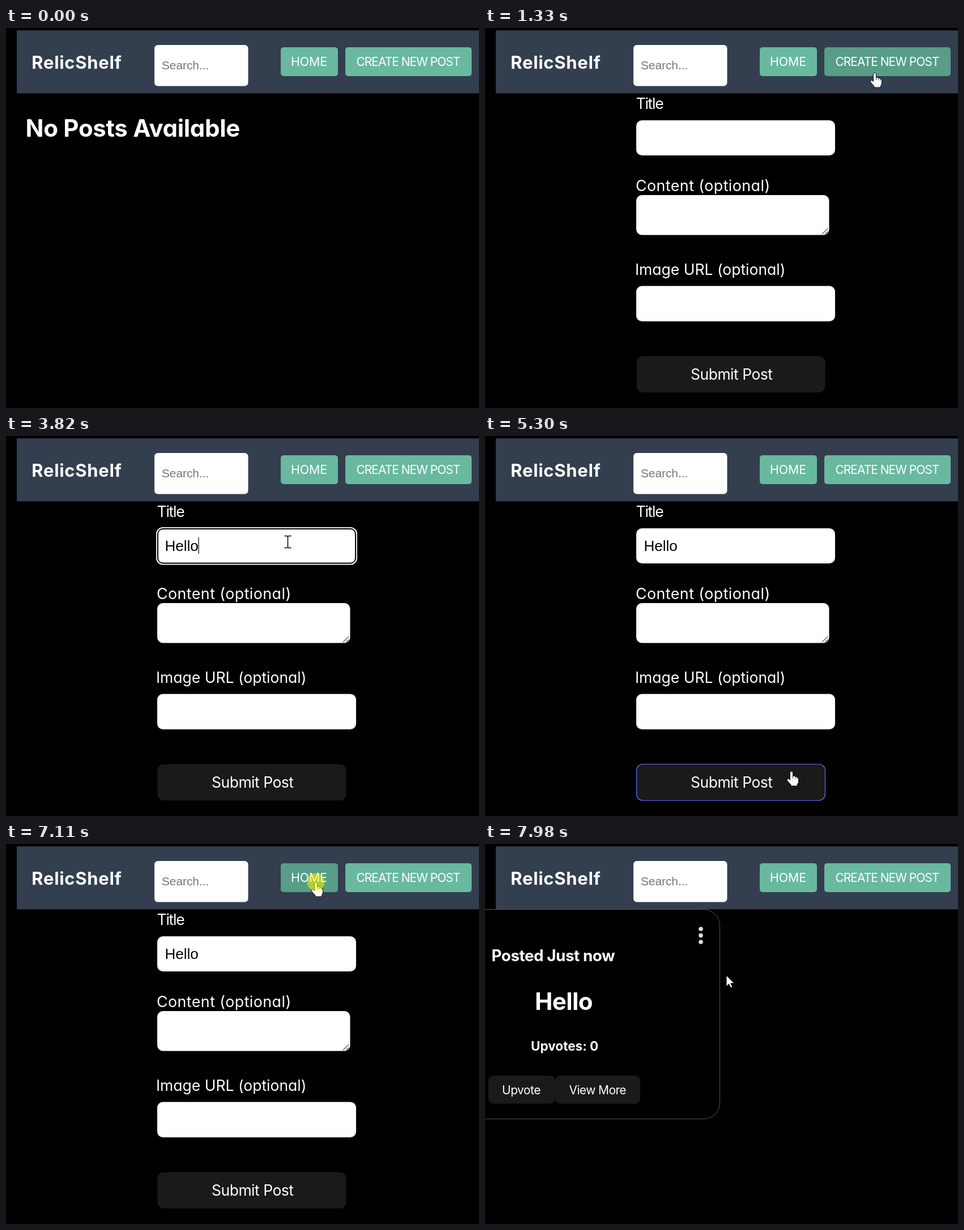
Animation of 835 by 671 pixels, one loop 8000 ms. Source, as an HTML page:

```html
<!DOCTYPE html>
<html lang="en">
<head>
<meta charset="utf-8">
<title>Posting demo</title>
<style>
html, body { margin: 0; width: 100%; height: 100%; overflow: hidden; background: #000; }
svg { display: block; width: 100vw; height: 100vh; }
text {
  font-family: Inter, "Open Sans", sans-serif;
  font-weight: 400;
  font-feature-settings: "cv11";
  fill: #fff;
  white-space: pre;
}
.bold { font-weight: 700; }
.plain { font-family: "Liberation Sans", Arial, sans-serif; }
.dark { fill: #1a1a1a; }
</style>
</head>
<body>
<svg id="stage" viewBox="0 0 835 671" xmlns="http://www.w3.org/2000/svg"></svg>
<script>
const LOOP = 8000;
const GREEN = "#69b8a0", GREEN_HOVER = "#589d87";
const stage = document.getElementById("stage");

function el(parent, name, attrs = {}, content) {
  const node = document.createElementNS(stage.namespaceURI, name);
  for (const key in attrs) node.setAttribute(key, attrs[key]);
  if (content) node.textContent = content;
  return parent.appendChild(node);
}
const group = (parent = stage) => el(parent, "g");
const box = (parent, [x, y, width, height], rx, attrs) =>
  el(parent, "rect", { x, y, width, height, rx, ...attrs });
const label = (parent, str, x, y, size, spacing = 0, cls = "") =>
  el(parent, "text", { x, y, "font-size": size, "letter-spacing": spacing, class: cls }, str);
const show = (node, on) => node.setAttribute("visibility", on ? "inherit" : "hidden");
const within = ([x, y, w, h], px, py) => px >= x && px <= x + w && py >= y && py <= y + h;

const AREA = {
  search: [262, 30, 165.5, 72.5],
  home: [485, 34, 101, 51],
  create: [599, 34, 223, 51],
  title: [267, 163, 351, 62],
  content: [267, 295, 340.5, 70.5],
  image: [267, 455.5, 351, 62.5],
  submit: [267, 579, 334, 65]
};

// Header
box(stage, [19, 4.3, 816, 111.1], 0, { fill: "#333e4e" });
label(stage, "RelicShelf", 45.3, 72, 31, .7, "bold");
box(stage, AREA.search, 6, { fill: "#fff" });
label(stage, "Search...", 275, 73, 20.8, 0, "plain").style.fill = "#757575";
const homeBtn = box(stage, AREA.home, 5);
const createBtn = box(stage, AREA.create, 5);
label(stage, "HOME", 503, 67.3, 21.3);
label(stage, "CREATE NEW POST", 618.5, 67.3, 21, -1);

// Empty list
const empty = group();
label(empty, "No Posts Available", 34.5, 192, 42, -.3, "bold");

// Form
const form = group();
label(form, "Title", 266.5, 143, 26.5, -1.2);
label(form, "Content (optional)", 266, 288, 26.8, .45);
label(form, "Image URL (optional)", 265, 435.5, 26.5);
for (const key of ["title", "content", "image"]) box(form, AREA[key], 10, { fill: "#fff" });
el(form, "path", { d: "M595 364L605 354M600.5 364L605 359.5", stroke: "#555", "stroke-width": 1.2 });
const ring = group(form);
box(ring, [265, 161, 355, 66.5], 12, { fill: "#fff" });
box(ring, [266.8, 162.8, 351.4, 62.9], 10.5, { fill: "#101010" });
box(ring, [269, 165, 347, 58.5], 8, { fill: "#fff" });
const typed = label(form, "", 280.5, 202.5, 26, 0, "plain");
typed.style.fill = "#000";
const caret = box(form, [0, 179, 1.2, 29], 0, { fill: "#000" });
const submitBtn = box(form, [267.5, 579.5, 333, 64], 11, { class: "dark", "stroke-width": 1.2 });
label(form, "Submit Post", 363, 620.5, 26.5, -.5);

// Post card
const card = group();
box(card, [-120, 115.5, 534.4, 370], 28, { fill: "#000", stroke: "#555" });
for (const cy of [150, 161.5, 173]) el(card, "circle", { cx: 381, cy, r: 3.8, fill: "#ddd" });
label(card, "Posted Just now", 11.5, 207, 27.8, -.45, "bold");
label(card, "Hello", 88, 293, 42, -.6, "bold");
label(card, "Upvotes: 0", 81, 365, 22.5, 0, "bold");
box(card, [6, 409, 118, 49.5], 9, { class: "dark" });
box(card, [124, 409, 150, 49.5], 9, { class: "dark" });
label(card, "Upvote", 30, 441.5, 21, -.5);
label(card, "View More", 148.5, 441.5, 21, -.6);

// Pointer
const pointer = group();
const outline = { fill: "#fff", stroke: "#000", "stroke-width": 1, "stroke-linejoin": "round" };
const cursors = { arrow: group(pointer), hand: group(pointer), beam: group(pointer) };
el(cursors.arrow, "path", { d: "M0 0V19.5L4.5 15.2L7.7 21.8L10.8 20.4L7.8 14H14Z", ...outline });
el(cursors.hand, "path", {
  d: "M-2.6 2Q0 -2 2.6 2V8.5Q5.4 7 7 9.5Q9.2 8.6 10.2 11Q12.6 10.6 12.6 13.5V18" +
     "Q12.6 21 10.4 23.3V26H-1V23.6Q-4.5 20.5 -7.6 16.3Q-8.8 13.2 -6 13Q-4.2 13.4 -2.6 15.4Z",
  ...outline
});
el(cursors.hand, "path", { d: "M2.6 8.5V13M6.6 9.5V13.5M10 11V14", stroke: "#333", "stroke-width": .9 });
el(cursors.beam, "path", {
  d: "M-4.5 -9.5H0L1.5 -8.5L3 -9.5H7.5M1.5 -8.5V10.5M-4.5 11.5H0L1.5 10.5L3 11.5H7.5",
  fill: "none", stroke: "#000", "stroke-width": 1.5
});
const glow = el(pointer, "circle", { r: 15.5, fill: "#ff0", "fill-opacity": .5 });

// Each move: first and last change, number of steps, Bezier points
const MOVES = [
  { from: 390, to: 930, steps: 9, path: [[712, 568], [725, 380], [715, 110], [688, 79]] },
  { from: 1730, to: 2060, steps: 6, path: [[688, 79], [670, 513], [520, 513], [496, 186]] },
  { from: 4350, to: 5100, steps: 11, path: [[496, 186], [500, 300], [545, 480], [541, 592]] },
  { from: 6570, to: 7040, steps: 8, path: [[541, 592], [600, 200], [720, -100], [547, 67]] },
  { from: 7840, to: 7980, steps: 3, path: [[547, 67], [520, 110], [470, 180], [426, 232]] }
];
const CLICKS = [[1260, 1330], [2120, 2250], [5170, 5300], [7110, 7240]];
const KEYS = [3160, 3290, 3420, 3620, 3820];
const CARET_OFF = [[2660, 3160], [4350, 4850]];
const inSpan = (t, spans) => spans.some(([a, b]) => t >= a && t < b);

function bezier([a, b, c, d], u) {
  const v = 1 - u;
  return [0, 1].map(i =>
    v * v * v * a[i] + 3 * v * v * u * b[i] + 3 * v * u * u * c[i] + u * u * u * d[i]);
}

function pointerAt(t) {
  const index = MOVES.findLastIndex(m => t >= m.from);
  if (index < 0) return null;
  const { from, to, steps, path } = MOVES[index];
  const gap = (to - from) / (steps - 1);
  const done = Math.min(steps - 1, Math.floor((t - from) / gap + .01));
  const u = index ? (done + 1) / steps : done / (steps - 1);
  return bezier(path, u * u * (3 - 2 * u));
}

function draw(t) {
  const formOn = t >= 1330 && t < 7240;
  const focused = t >= 2190 && t < 5170;
  show(empty, t < 1330 || (t >= 7240 && t < 7390));
  show(form, formOn);
  show(card, t >= 7390);
  show(ring, formOn && focused);

  const count = KEYS.filter(k => t >= k).length;
  typed.textContent = "Hello".slice(0, count);
  show(caret, focused && !inSpan(t, CARET_OFF));
  caret.setAttribute("x", 280.5 + (count ? typed.getComputedTextLength() - .3 : 0));

  const pos = pointerAt(t);
  const [x, y] = pos || [-99, -99];
  const over = key => within(AREA[key], x, y);
  const onSubmit = formOn && over("submit");
  homeBtn.setAttribute("fill", over("home") ? GREEN_HOVER : GREEN);
  createBtn.setAttribute("fill", over("create") ? GREEN_HOVER : GREEN);
  submitBtn.setAttribute("stroke", onSubmit ? "#646cff" : "none");

  const onText = over("search") || (formOn && ["title", "content", "image"].some(over));
  const kind = onSubmit || over("home") || over("create") ? "hand" : onText ? "beam" : "arrow";
  show(pointer, pos);
  pointer.setAttribute("transform", `translate(${x} ${y})`);
  for (const key in cursors) show(cursors[key], pos && key === kind);
  show(glow, inSpan(t, CLICKS));
}

const start = performance.now();
function tick() {
  draw((performance.now() - start) % LOOP);
  requestAnimationFrame(tick);
}
tick();
</script>
</body>
</html>
```
